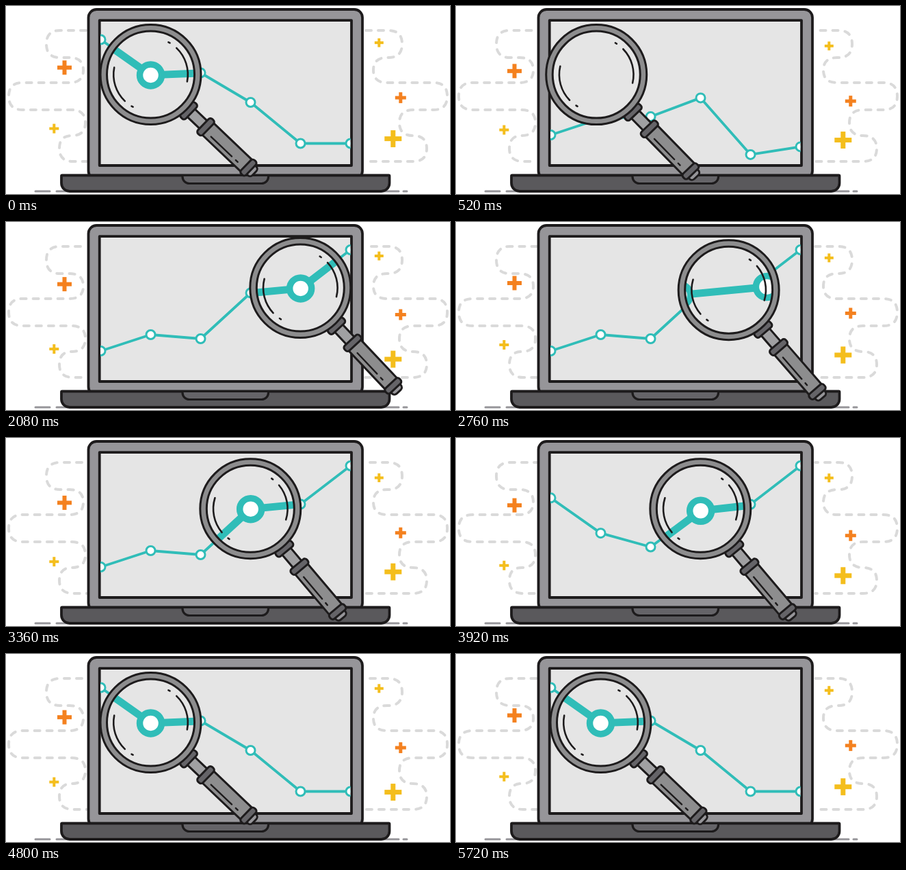
An HTML page with a canvas that plays this animation: 649 by 277 pixels, repeating every 5760 ms.

```html
<!DOCTYPE html>
<html lang="en">
<head>
<meta charset="utf-8">
<title>Chart under a magnifying glass</title>
<style>
html, body { margin: 0; width: 100%; height: 100%; overflow: hidden; background: #fff; }
canvas { display: block; }
</style>
</head>
<body>
<canvas id="stage" width="649" height="277"></canvas>
<script>
const ctx = document.getElementById('stage').getContext('2d');
const LOOP = 5760, HALF = LOOP / 2, DASH = 18;
const INK = '#1d1b1c', DARK = '#5a595c', TRIM = '#656468', METAL = '#969599', STEEL = '#8d8d8e',
      NECK = '#a0a0a2', PAPER = '#e5e5e5', TEAL = '#30bdb8', ORANGE = '#f4811f', YELLOW = '#f4be1d';

const xs = [138.5, 211.5, 284.5, 357.5, 430.5, 503.5];
const falling = [49.5, 101.5, 98.5, 142, 202.5, 202.5];
const rising = [190, 166, 172, 104.5, 97.5, 41];
const ZOOM = 1.75;

// x, middle y, half length, thickness, colour, phase of the bobbing
const crosses = [
  [85.5, 94.3, 10.5, 6, ORANGE, .38],
  [70.3, 185.4, 7, 4, YELLOW, .53],
  [545.3, 54.7, 6.5, 4, YELLOW, .27],
  [576.8, 138.9, 8, 5, ORANGE, .39],
  [565.8, 200.4, 12.5, 7, YELLOW, .53]
];

const leftTrail = new Path2D('M118 36H79Q59 36 59 56T79 76H93Q113 76 113 94.5T93 113H24Q4 113 4 133T24 153H96Q116 153 116 172T96 191Q78 191 78 210T98 229H118');
const rightTrail = new Path2D('M525 36H559Q579 36 579 56T559 76H557Q537 76 537 94.5T557 113H625Q645 113 645 133T625 153H595Q575 153 575 172T595 191Q615 191 615 210T595 229H525');

const mix = (a, b, p) => a + (b - a) * p;
const span = (t, start, length) => Math.min(1, Math.max(0, (t - start) / length));

const backHalf = (u, s) => u * u * ((s + 1) * u - s) / 2;
const backInOut = (p, s) => p < .5 ? backHalf(2 * p, s) : 1 - backHalf(2 - 2 * p, s);
const backInSoftOut = p => p < .5 ? backHalf(2 * p, 3.5) : 1 - (2 - 2 * p) ** 5 / 2;
const cubicInOut = p => p < .5 ? 4 * p ** 3 : 1 - 4 * (1 - p) ** 3;

function paint(fill, stroke, width, path) {
  const args = path ? [path] : [];
  if (fill) { ctx.fillStyle = fill; ctx.fill(...args); }
  if (stroke) { ctx.strokeStyle = stroke; ctx.lineWidth = width; ctx.stroke(...args); }
}
function box(x, y, w, h, r, fill, width = 3) {
  ctx.beginPath();
  ctx.roundRect(x, y, w, h, r);
  paint(fill, INK, width);
}
function disc(x, y, r, fill, stroke, width) {
  ctx.beginPath();
  ctx.arc(x, y, r, 0, 7);
  paint(fill, stroke, width);
}
function line(points, color, width) {
  ctx.beginPath();
  points.forEach(([x, y]) => ctx.lineTo(x, y));
  paint(null, color, width);
}

function chartPoints(t) {
  return xs.map((x, i) => {
    const up = backInSoftOut(span(t, 46 + 88 * i, 480));
    const down = cubicInOut(span(t, 3638 + 60 * i, 480));
    return [x, mix(mix(falling[i], rising[i], up), falling[i], down)];
  });
}
function drawChart(points, lineWidth, r, ring) {
  line(points, TEAL, lineWidth);
  points.forEach(([x, y]) => disc(x, y, r, '#fff', TEAL, ring));
}

function lensPose(t) {
  const pose = { x: 211.5, y: 101, turn: 43.8 };
  // start, duration, x, y, turn, swing
  for (const [start, time, x, y, turn, swing] of [
    [440, 600, 430.3, 97, 46.8, 5.4],
    [2480, 580, 357.3, 104.3, 50, 1],
    [4200, 580, 211.5, 101, 43.8, .8]
  ]) {
    const p = span(t, start, time), e = backInOut(p, 1.45);
    pose.x = mix(pose.x, x, e);
    pose.y = mix(pose.y, y, e);
    pose.turn = mix(pose.turn, turn, e) + swing * Math.sin(Math.PI * p);
  }
  return pose;
}

function drawBackground(t) {
  ctx.lineCap = 'round';
  ctx.setLineDash([8, DASH - 8]);
  ctx.lineDashOffset = -(t / LOOP * 4 * DASH + 1);
  paint(null, '#dadada', 4, leftTrail);
  paint(null, '#dadada', 4, rightTrail);
  ctx.setLineDash([]);
  ctx.lineCap = 'butt';
  for (const [x, mid, arm, width, color, phase] of crosses) {
    const y = mid + 4.9 * Math.cos(2 * Math.PI * (t / HALF - phase));
    line([[x - arm, y], [x + arm, y]], color, width);
    line([[x, y - arm], [x, y + arm]], color, width);
  }
  ctx.lineCap = 'round';
  for (const [a, b] of [[43, 64], [74, 90], [550, 574], [581, 586]])
    line([[a, 273], [b, 273]], METAL, 3);
}

function drawLaptop(points) {
  box(120.5, 5, 400.5, 250, 12, METAL, 3.8);
  box(136.7, 21.2, 368.3, 213.8, 0, PAPER, 3.8);
  ctx.save();
  ctx.beginPath();
  ctx.rect(138, 22.5, 365.5, 211);
  ctx.clip();
  drawChart(points, 3.8, 6.5, 3);
  ctx.restore();
  box(81, 249.5, 479.5, 23.5, [1, 1, 12, 12], DARK, 3.8);
  box(258, 249.5, 125.5, 12, [0, 0, 10, 10], TRIM, 3.2);
}

function drawLens(points, { x, y, turn }) {
  ctx.save();
  ctx.translate(x, y);
  ctx.save();
  ctx.rotate(turn * Math.PI / 180);
  box(199, -9, 11, 18, 5, METAL);
  box(80, -8, 30, 16, 0, NECK);
  box(114, -12, 82, 24, 1, STEEL);
  line([[127, 5], [169, 5]], INK, 2.4);
  line([[177, 5], [181, 5]], INK, 2.4);
  box(72, -15, 10, 30, 4, TRIM);
  box(106.5, -15, 10, 30, 4, TRIM);
  box(193, -14, 10, 28, 4, TRIM);
  ctx.restore();

  disc(0, 0, 73.5, STEEL, INK, 3);
  disc(0, 0, 64, PAPER);
  ctx.save();
  ctx.beginPath();
  ctx.arc(0, 0, 63.5, 0, 7);
  ctx.clip();
  drawChart(points.map(([px, py]) => [(px - x) * ZOOM, (py - y) * ZOOM]), 11, 16, 9.5);
  ctx.restore();
  disc(0, 0, 64, null, INK, 3);

  ctx.rotate((turn - 43.8) * Math.PI / 180);
  for (const side of [0, Math.PI])
    for (const [a, b] of [[-46, 11], [-61.5, -59]]) {
      ctx.beginPath();
      ctx.arc(0, 0, 54.3, side + a * Math.PI / 180, side + b * Math.PI / 180);
      paint(null, INK, 2.6);
    }
  ctx.restore();
}

function frame(now) {
  const t = now % LOOP, points = chartPoints(t);
  ctx.fillStyle = '#fff';
  ctx.fillRect(0, 0, 649, 277);
  ctx.lineJoin = 'round';
  drawBackground(t);
  drawLaptop(points);
  drawLens(points, lensPose(t));
}

const begin = performance.now();
function tick() {
  frame(performance.now() - begin);
  requestAnimationFrame(tick);
}
tick();
</script>
</body>
</html>
```
